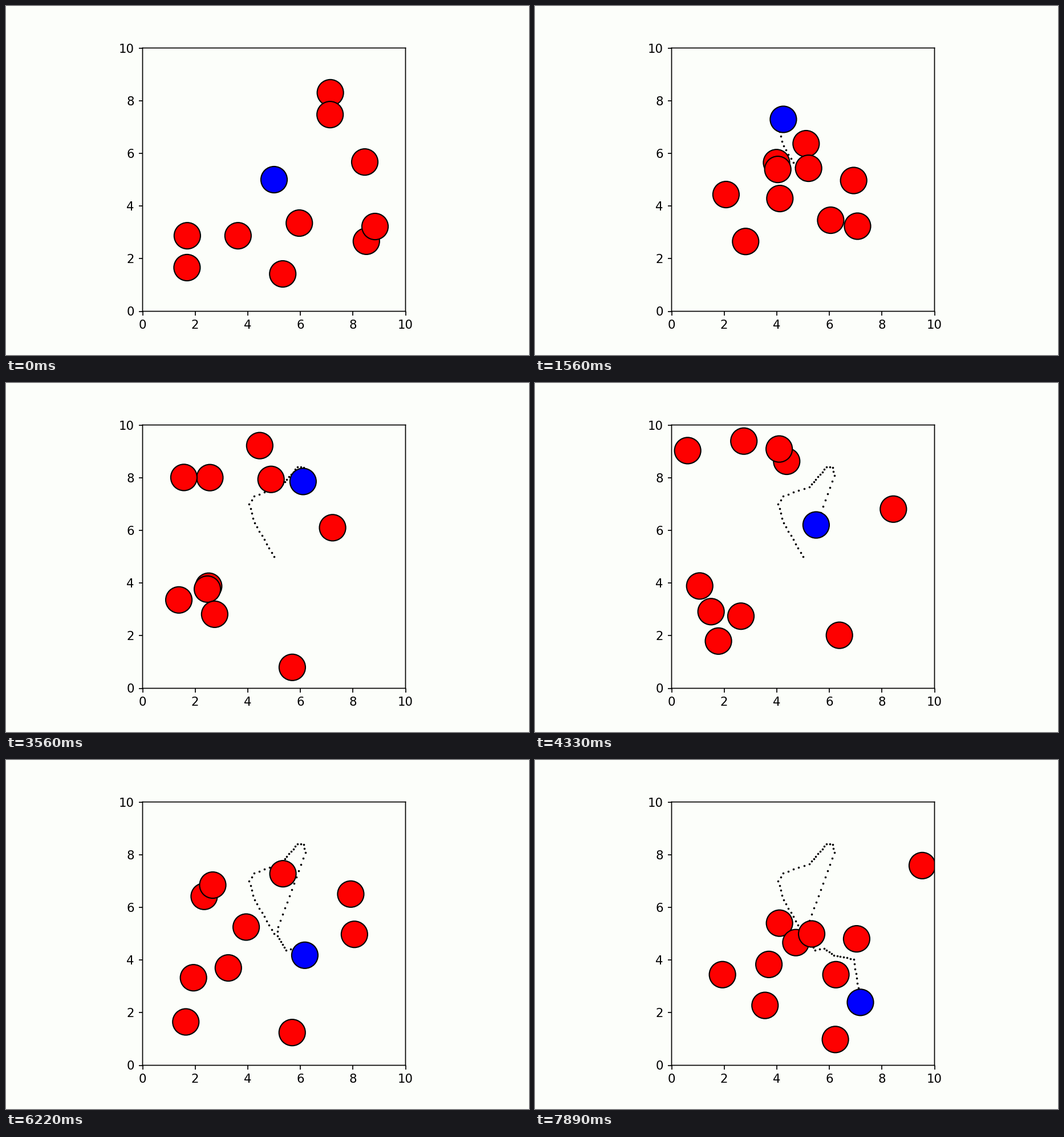
Animation of 917 by 611 pixels, one loop 8 s. Source, as a matplotlib script:

```python
import numpy as np
import matplotlib.pyplot as plt
from matplotlib.animation import FuncAnimation
from matplotlib.patches import Circle

W, H, DPI = 917, 611, 128
LOOP_MS, TICK_MS, STEPS = 8000, 40, 72
LEFT, TOP, SIDE = 239.5, 73.5, 461
RADIUS, SPEED, ARENA = 0.5, 0.2, 10
BG = "#fcfefa"
K = 152.8 / DPI  # keeps default line and font sizes at the stage's scale

plt.rcParams.update({
    "font.family": "DejaVu Sans", "font.size": 10 * K, "axes.linewidth": 0.8 * K,
    **{f"{a}tick.major.{p}": v * K for a in "xy"
       for p, v in (("size", 3.5), ("width", 0.8), ("pad", 3.5))},
})

# Obstacles: start x, start y, heading in degrees
OBSTACLES = np.array([
    (7.14, 8.30, 223.7), (3.63, 2.87, 82.6), (1.69, 1.66, 82.2), (8.45, 5.67, 240.5),
    (5.33, 1.42, 153.9), (8.51, 2.66, 124.5), (5.96, 3.35, 133.3), (1.70, 2.87, 30.3),
    (8.84, 3.22, 175.1), (7.13, 7.47, 226.7),
])

# Robot waypoints: step, x, y
WAYPOINTS = np.array([
    (0, 5.00, 5.00), (8, 4.26, 6.28), (12, 4.05, 7.00), (14, 4.25, 7.29),
    (17, 4.83, 7.52), (19, 5.24, 7.65), (27, 5.89, 8.41), (29, 6.13, 8.38),
    (31, 6.19, 8.09), (43, 5.15, 5.26), (45, 5.13, 4.92), (50, 5.46, 4.38),
    (52, 5.81, 4.44), (56, 6.17, 4.18), (62, 6.92, 4.03), (71, 7.18, 2.39),
])


def obstacle_paths():
    """Straight runs that turn straight back on touching a wall."""
    pos = OBSTACLES[:, :2]
    ang = np.radians(OBSTACLES[:, 2])
    vel = SPEED * np.column_stack([np.cos(ang), np.sin(ang)])
    path = [pos]
    for _ in range(STEPS - 1):
        pos = pos + vel
        hit = ((pos < RADIUS) | (pos > ARENA - RADIUS)).any(axis=1)
        vel = np.where(hit[:, None], -vel, vel)
        path.append(pos)
    return np.array(path)


def robot_path():
    steps = np.arange(STEPS)
    t, x, y = WAYPOINTS.T
    return np.column_stack([np.interp(steps, t, x), np.interp(steps, t, y)])


obstacles = obstacle_paths()
robot = robot_path()

fig = plt.figure(figsize=(W / DPI, H / DPI), dpi=DPI, facecolor=BG)
ax = fig.add_axes([LEFT / W, 1 - (TOP + SIDE) / H, SIDE / W, SIDE / H], facecolor=BG)
ax.set(xlim=(0, ARENA), ylim=(0, ARENA),
       xticks=range(0, 11, 2), yticks=range(0, 11, 2))
for spine in ax.spines.values():
    spine.set_snap(False)

trail, = ax.plot([], [], "o", color="black", ms=3.6 * 72 / DPI, mew=0, zorder=0.5)


def ball(color):
    return ax.add_patch(Circle((0, 0), RADIUS, fc=color, ec="black", lw=K))


balls = [ball("#fe0000") for _ in OBSTACLES]
agent = ball("#0000fe")


def update(i):
    # The simulation steps are longer than the display ticks
    step = min((i + 1) * TICK_MS * STEPS // LOOP_MS, STEPS - 1)
    for patch, p in zip(balls, obstacles[step]):
        patch.center = tuple(p)
    agent.center = tuple(robot[step])
    trail.set_data(*robot[:step + 1].T)
    return [trail, *balls, agent]


anim = FuncAnimation(fig, update, frames=LOOP_MS // TICK_MS, interval=TICK_MS,
                     repeat=True, repeat_delay=0, blit=False)
plt.show()
```
